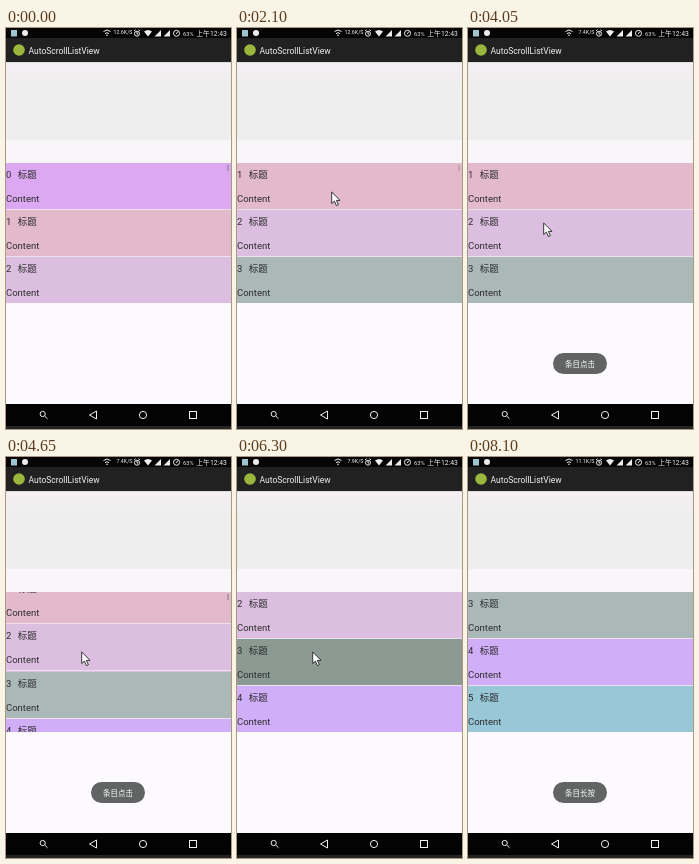
An HTML page for the animation above (8.25 s loop, 225 by 401 pixels).

```html
<!DOCTYPE html>
<html lang="zh">
<head>
<meta charset="utf-8">
<title>AutoScrollListView</title>
<style>
  html, body { margin: 0; width: 100%; height: 100%; overflow: hidden; background: #fcfafe; }
  svg { display: block; width: 100vw; height: 100vh; }
  text { font-family: Roboto, "Noto Sans CJK SC", "Noto Sans CJK", sans-serif; white-space: pre; }
  .row text { font-size: 9.5px; fill: #2c2c2c; }
  .bar text { fill: #f2f2f2; }
  .line { fill: none; stroke: #eee; stroke-width: 1; }
  .icon { fill: #eee; }
</style>
</head>
<body>
<svg viewBox="0 0 225 401">
  <defs>
    <clipPath id="window"><rect y="135" width="225" height="140"/></clipPath>
    <linearGradient id="head" x2="0" y2="1">
      <stop offset="0" stop-color="#f4eff3"/>
      <stop offset=".25" stop-color="#efeeef"/>
      <stop offset="1" stop-color="#eee"/>
    </linearGradient>
  </defs>
  <rect width="225" height="401" fill="#fcfafe"/>
  <rect y="34" width="225" height="78" fill="url(#head)"/>
  <rect y="112" width="225" height="23" fill="#f8f6f9"/>

  <g clip-path="url(#window)">
    <g id="list"></g>
    <rect id="thumb" x="221" y="137" width="2" height="6" fill="#8d8190"/>
  </g>

  <g class="bar">
    <rect width="225" height="10" fill="#050505"/>
    <rect y="10" width="225" height="24" fill="#212121"/>
    <rect y="34" width="225" height="1" fill="#dedcde"/>
    <circle cx="13" cy="22" r="5.8" fill="#9bb63c"/>
    <text x="22.5" y="25.5" font-size="8.5">AutoScrollListView</text>

    <rect x="5" y="2" width="6" height="6.5" fill="#9fc4cf"/>
    <circle cx="19" cy="5" r="3" class="icon"/>
    <path class="line" d="M97.5 3.5q3.5-3 7 0M99 5.6q2-1.8 4 0"/>
    <circle cx="101" cy="7.2" r=".8" class="icon"/>
    <text id="speed" x="126.5" y="6.2" font-size="5.3" text-anchor="end"></text>
    <circle cx="131" cy="5.7" r="2.5" class="line"/>
    <path class="line" d="M128 3l1.6-1.3M134 3l-1.6-1.3M131 4v2h1.3"/>
    <path class="icon" d="M138 3.5q4-3 8 0l-4 5zM155 2v6.5h-6.5zM164 2v6.5h-6.5z"/>
    <circle cx="170.5" cy="5.3" r="3" class="line"/>
    <path class="line" d="M170 6l2-2.5"/>
    <text x="177" y="7.6" font-size="5.7">63%</text>
    <text x="190.3" y="7.8" font-size="6.8">上午12:43</text>
  </g>

  <g>
    <rect y="376" width="225" height="22" fill="#030303"/>
    <rect y="398" width="225" height="3" fill="#242424"/>
    <circle cx="36.7" cy="386" r="2.6" class="line"/>
    <path class="line" d="M38.7 388l2.8 2.8M90.5 383v8l-7-4z"/>
    <circle cx="137" cy="387" r="3.6" class="line"/>
    <rect x="183.5" y="383.5" width="7" height="7" class="line"/>
  </g>

  <g id="toast">
    <rect x="85" y="325" width="54" height="21" rx="10.5" fill="#616463"/>
    <text id="message" x="112" y="338.6" font-size="7.5" text-anchor="middle" fill="#fff"></text>
  </g>
  <path id="cursor" d="M0 0v11.5l2.7-2.4 2 4.5 2-.9-2-4.3h3.7z" fill="#fff" stroke="#222" stroke-width=".9"/>
</svg>
<script>
const LOOP = 8250, STEP = 150, TOP = 134.6, PITCH = 47.3;
const FIRST_SCROLL = 1545, SCROLL_PERIOD = 2950, SCROLL_TIME = 500;
const CLICK = 3000, PRESS = 6100, LONG_PRESS = 6700;
const COLORS = ['#dca8f1', '#e2bacb', '#dcbfe0', '#aab9b8', '#d1aef8', '#98c7d8'];
const SPEEDS = ['12.6K/S', '7.4K/S', '7.9K/S', '11.1K/S'];

const $ = id => document.getElementById(id);
const set = (id, name, value) => $(id).setAttribute(name, value);
const clamp = x => Math.max(0, Math.min(1, x));
const ease = x => (1 - Math.cos(Math.PI * clamp(x))) / 2;

// Whole pages scrolled so far plus the linear progress of the current scroll.
function pageAt(t) {
  const since = t - FIRST_SCROLL;
  if (since < 0) return 0;
  return Math.floor(since / SCROLL_PERIOD) + clamp(since % SCROLL_PERIOD / SCROLL_TIME);
}

// The thumb shows on load and at each scroll, then fades.
function thumbAt(t) {
  const age = t < FIRST_SCROLL ? t : (t - FIRST_SCROLL) % SCROLL_PERIOD;
  return .6 * clamp((650 - age) / 150);
}

function toastAt(t) {
  const age = t - (t < LONG_PRESS ? CLICK : LONG_PRESS);
  return clamp(Math.min(age / 220, (2500 - age) / 350));
}

function cursorAt(t) {
  const enter = 1 - clamp((t - 1200) / 300), move = ease((t - 3450) / 600);
  return [94.7 + 23 * enter - 19 * move, 164 + 198 * enter + 31 * move];
}

const rows = COLORS.map((color, i) => {
  const row = document.createElementNS('http://www.w3.org/2000/svg', 'g');
  row.setAttribute('class', 'row');
  row.innerHTML = `
    <rect width="225" height="48" fill="${color}"/>
    <rect class="press" width="225" height="48" fill="#4a5a48"/>
    <rect y="46" width="225" height="1" fill="#ece2ef"/>
    <text y="15">${i}</text><text x="11.7" y="15">标题</text>
    <text y="38.6">Content</text>`;
  return $('list').appendChild(row);
});

function draw(t) {
  const page = pageAt(t);
  const pressedRow = t >= PRESS && t <= LONG_PRESS ? 3 : t === CLICK ? 1 : -1;
  rows.forEach((row, i) => {
    row.setAttribute('transform', `translate(0 ${Math.round(TOP + (i - page) * PITCH)})`);
    row.querySelector('.press').setAttribute('opacity', i === pressedRow ? .32 : 0);
  });
  set('thumb', 'opacity', thumbAt(t));
  set('toast', 'opacity', toastAt(t));
  $('message').textContent = t < LONG_PRESS ? '条目点击' : '条目长按';
  $('speed').textContent = SPEEDS[Math.floor((t + 600) / 2850)];
  set('cursor', 'transform', `translate(${cursorAt(t)})`);
  set('cursor', 'visibility', t >= 1200 && t < 7200 ? 'visible' : 'hidden');
}

const start = performance.now();
function tick() {
  const t = (performance.now() - start) % LOOP;
  draw(Math.floor(t / STEP) * STEP);
  requestAnimationFrame(tick);
}
tick();
</script>
</body>
</html>
```
